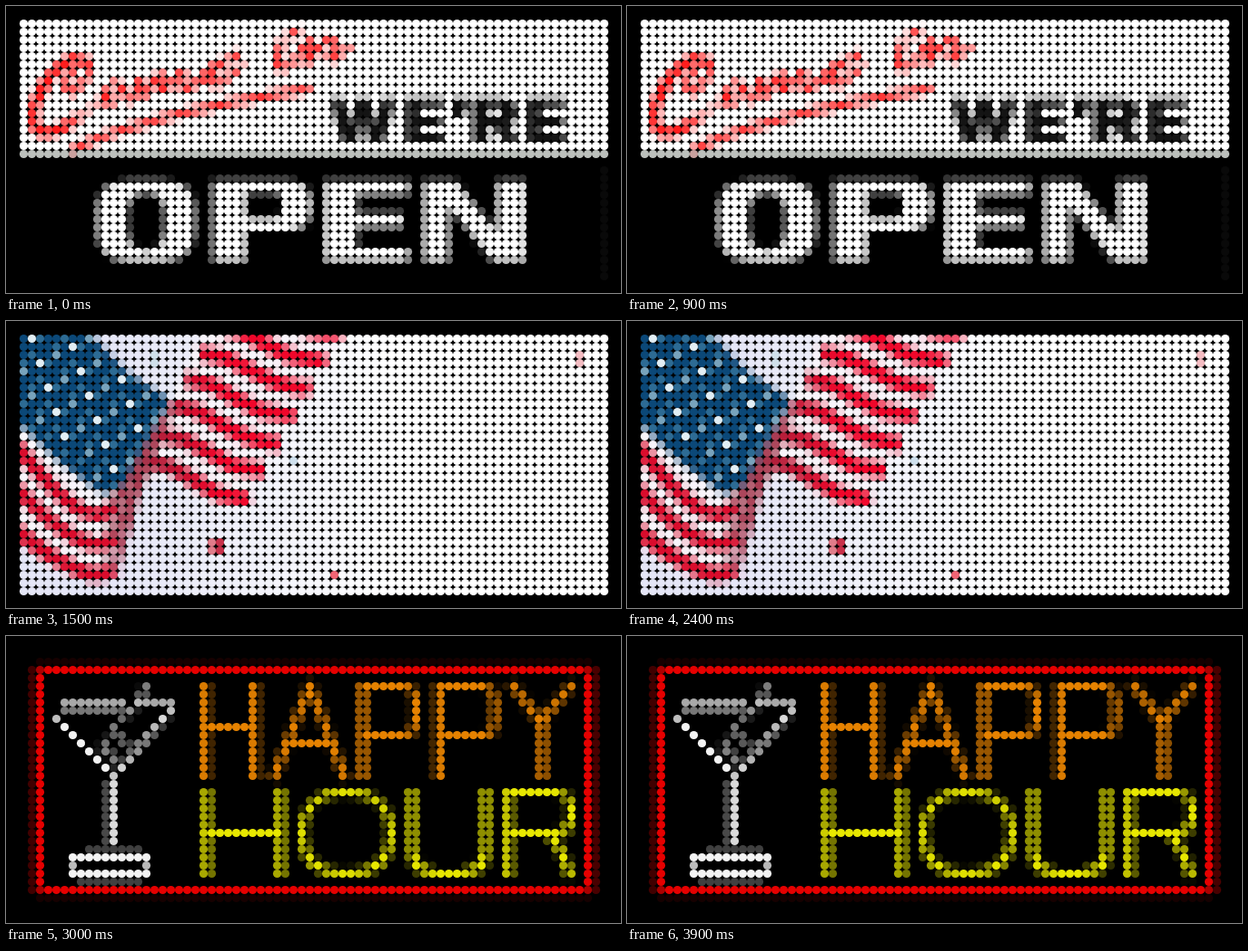
Animation of 677 by 317 pixels, one loop 4500 ms. Source, as an HTML page with a canvas:

```html
<!DOCTYPE html>
<html lang="en">
<head>
<meta charset="utf-8">
<title>LED sign</title>
<style>
  html, body { margin: 0; width: 100%; height: 100%; overflow: hidden; background: #000; }
  canvas { display: block; }
</style>
</head>
<body>
<canvas id="sign" width="677" height="317"></canvas>
<script>
const COLS = 72, ROWS = 32, PITCH = 9, EDGE = 15, HOLD = 1500;
const screen = document.getElementById('sign').getContext('2d');

// Artwork is drawn in stage coordinates and reduced to one pixel per lamp.
const small = document.createElement('canvas');
small.width = COLS;
small.height = ROWS;
const pen = small.getContext('2d', { willReadFrequently: true });
pen.setTransform(1 / PITCH, 0, 0, 1 / PITCH, -EDGE / PITCH, -EDGE / PITCH);

function fill(path, color) {
  pen.fillStyle = color;
  pen.fill(new Path2D(path), 'evenodd');
}

function stroke(path, color, width = 9, cap = 'butt') {
  pen.strokeStyle = color;
  pen.lineWidth = width;
  pen.lineCap = cap;
  pen.lineJoin = 'round';
  pen.stroke(new Path2D(path));
}

function lamps(col, row, color, w = 1, h = 1) {
  pen.fillStyle = color;
  pen.fillRect(EDGE + col * PITCH, EDGE + row * PITCH, w * PITCH, h * PITCH);
}

function open() {
  lamps(0, 0, '#fff', COLS, 16);
  lamps(0, 16, '#bcc0bc', COLS);
  lamps(71, 18, '#090909', 1, 14);

  const red = '#ff1c1c';
  stroke('M70 92Q62 96 67 80Q79 58 90 59Q98 70 82 90Q74 98 68 94', red, 8, 'round');
  stroke('M78 56Q42 72 31 110Q26 142 45 139Q62 138 76 126', red, 11, 'round');
  stroke('M76 126Q92 116 106 102', '#ff8a8a', 8, 'round');
  stroke('M109 105Q104 89 118 86Q132 84 128 97Q121 110 109 105', red, 8, 'round');
  stroke('M138 104L148 80L151 101L170 74L172 96L194 71L194 92Q204 92 214 82', red, 8, 'round');
  stroke('M214 82Q238 74 238 63Q226 60 220 76Q222 92 238 84Q246 78 258 68M246 58L255 54', red, 8, 'round');
  stroke('M302 42L298 68Q308 76 321 55L334 37L331 64L346 42Q358 31 362 38L356 58Q364 64 377 45M313 31L320 29', red, 8, 'round');
  stroke('M72 158Q160 118 336 91', red, 8);

  const ink = '#141414', letterE = 'H482V112H455V122H480V131H455V141H482V150H440Z';
  fill('M357 103H372L379 132L386 103H400L407 132L414 103H429L415 150H400L393 124L386 150H370Z', ink);
  fill('M440 103' + letterE, ink);
  fill('M492 103H508V113L500 122H492Z', ink);
  fill('M514 103H548Q564 103 564 117Q564 129 552 131L566 150H549L536 133H530V150H514ZM530 112V123H545V112Z', ink);
  pen.save();
  pen.translate(134, 0);
  fill('M440 103' + letterE, ink);
  pen.restore();

  fill('M135 192H172Q208 192 208 222V250Q208 283 172 283H135Q100 283 100 250V222Q100 192 135 192Z' +
       'M154 206Q134 206 134 226V248Q134 270 154 270Q174 270 174 248V226Q174 206 154 206Z', '#fff');
  fill('M227 192H312Q337 192 337 220Q337 249 310 249H265V282H227ZM265 207V234H296Q304 234 304 220Q304 207 296 207Z', '#fff');
  fill('M350 192H444V208H386V229H437V245H386V266H444V282H350Z', '#fff');
  fill('M459 192H495L540 250V192H572V282H536L488 222V282H459Z', '#fff');
}

function flag() {
  const sky = pen.createLinearGradient(110, 0, 430, 0);
  sky.addColorStop(0, '#e5e6f7');
  sky.addColorStop(1, '#fff');
  lamps(0, 0, sky, COLS, ROWS);

  fill('M15 112L108 190L150 140L182 86L214 15H372L262 205Q232 212 178 172L152 172L106 284Q60 292 15 246Z', '#f8f4fa');
  fill('M182 90L160 172L138 200L106 284L112 190L150 140Z', '#c9a5b0');

  const red = pen.createLinearGradient(120, 0, 235, 0);
  red.addColorStop(0, '#d80a2a');
  red.addColorStop(0.12, '#a83a50');
  red.addColorStop(0.4, '#b41c38');
  red.addColorStop(1, '#f0062a');

  for (let k = -2; k <= 4; k++) {
    const x = 213 - 15.8 * k, y = 37 + 29.6 * k;
    const ex = 336 - 17 * k, ey = 73 + 30.6 * k;
    stroke(`M${x} ${y}C${x + 52} ${y - 6} ${x + 58} ${y + 44} ${ex} ${ey}`, red, 16);
  }
  for (let k = 0; k < 3; k++) {
    const y = 213 + 33 * k, top = 137 + 47 * k;
    stroke(`M11 ${top}Q66 ${y - 4} 94 ${y}Q112 ${y + 3} 120 ${y - 8}`, '#da0c2c', 15);
    stroke(`M119 ${y - 6}Q136 ${y - 50} ${182 - 16 * k} ${99 + 29 * k}`, '#a8364c', 8);
  }

  fill('M15 15H93L132 55L180 88L165 115L148 145L128 182L106 190L60 156L15 114Z', '#0b4878');
  for (let row = 0; row < 19; row++) {
    for (let col = 0; col < 17; col++) {
      const x = EDGE + col * PITCH, y = EDGE + row * PITCH;
      const inside = x < 90 + (y - 15) * 1.05 && y < 108 + (x - 15) * 0.76 && x + y * 0.55 < 222;
      const phase = (3 * col - row + 28) % 14;
      if (!inside) continue;
      if (phase === 3) lamps(col, row, '#e2eef4');
      else if (phase === 10) lamps(col, row, '#78a3bc');
      else if (phase % 5 === 1) lamps(col, row, '#2d6b94');
    }
  }

  lamps(16, 2, '#cfe0ea', 1, 2);
  lamps(33, 15, '#cfe0ee');
  lamps(23, 25, '#e07c8a', 1, 2);
  lamps(24, 25, '#c8304a', 1, 2);
  lamps(38, 29, '#f06474');
  lamps(68, 2, '#f4bcc2', 1, 2);
}

function happyHour() {
  lamps(1, 2, '#400000', 1, 28);
  lamps(70, 2, '#480000', 1, 28);
  lamps(2, 1, '#160000', 68);
  lamps(2, 30, '#160000', 68);
  stroke('M37.5 37.5H640.5V280.5H37.5Z', '#e60000');

  const gray = '#a8a8a8', white = '#f4f4f4';
  stroke('M60 73.5H132M141 73.5H186', gray);
  stroke('M60 82.5H130', '#777');
  stroke('M55.5 91.5L118.5 154.5L181.5 82.5', white, 9, 'round');
  stroke('M155 53L145.5 75L127 94', '#c4c4c4', 8);
  stroke('M118.5 98V108L108 118V132M126 108L134 124M118 128V140', '#999', 9);
  stroke('M109.5 159V240', '#484848');
  stroke('M118.5 154V240', '#dadada');
  stroke('M87 235.5H150M78 271.5H150', '#404040');
  stroke('M73.5 248V260M154.5 248V260', '#bbb');
  stroke('M69 244.5H159M69 262.5H159', white);

  const orange = '#e68200';
  stroke('M219 51V159M273 51V159', orange, 11);
  stroke('M217 100.5H272', orange);
  stroke('M294 159L334.5 54L374 159', orange, 10);
  stroke('M308 118.5H362', orange);
  stroke('M393 51V159', orange, 12);
  stroke('M392 55.5H440Q451 58 451 68V96Q450 108 438 109.5H392', orange, 10);
  stroke('M477 51V159', orange, 11);
  stroke('M478 55.5H526Q538 58 538 70V96Q538 108 526 109.5H478', orange, 10);
  stroke('M555 51L589 95L625 51', orange, 10);
  stroke('M590.5 91V159', orange, 12);

  const yellow = '#e8e800';
  stroke('M221 168V268M302 168V268', yellow, 11);
  stroke('M217 217.5H303', yellow);
  stroke('M374 172.5C340 172.5 326 190 326 217.5S340 262.5 374 262.5S424 245 424 217.5S408 172.5 374 172.5Z', yellow, 10);
  stroke('M447 168V238Q448 262.5 474 262.5H500Q528 262.5 528 238V168', yellow, 11);
  stroke('M553 168V268', yellow, 11);
  stroke('M552 172.5H606Q622 174 622 188V202Q622 217.5 606 217.5H552M596 217.5Q610 226 622 267', yellow, 10);
}

function sample(draw) {
  lamps(0, 0, '#000', COLS, ROWS);
  draw();
  return pen.getImageData(0, 0, COLS, ROWS).data;
}

const scenes = [open, flag, happyHour].map(sample);

function show(data) {
  screen.fillStyle = '#000';
  screen.fillRect(0, 0, 677, 317);
  for (let i = 0; i < COLS * ROWS; i++) {
    const [r, g, b] = data.subarray(i * 4, i * 4 + 3);
    if (r + g + b === 0) continue;
    screen.fillStyle = `rgb(${r},${g},${b})`;
    screen.beginPath();
    screen.arc(EDGE + (i % COLS + 0.5) * PITCH, EDGE + (Math.floor(i / COLS) + 0.5) * PITCH, 4.6, 0, Math.PI * 2);
    screen.fill();
  }
}

const start = performance.now();
let current = -1;

function tick() {
  const next = Math.floor((performance.now() - start) / HOLD) % scenes.length;
  if (next !== current) show(scenes[current = next]);
  requestAnimationFrame(tick);
}
tick();
</script>
</body>
</html>
```
